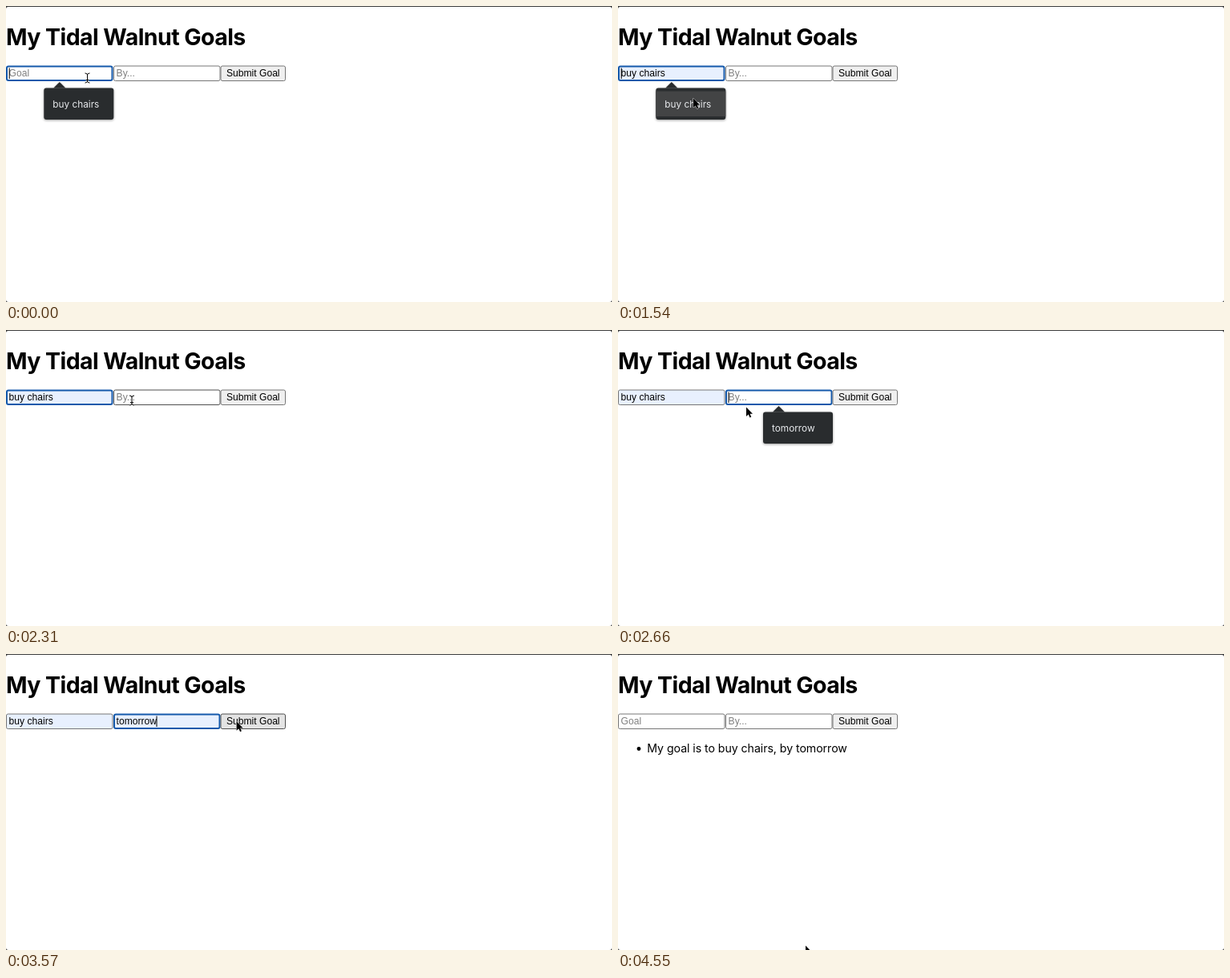
Write an HTML page that moves like this. It is 756 px wide and 370 px high and loops after 4.69 s.

```html
<!DOCTYPE html>
<html lang="en">
<head>
<meta charset="utf-8">
<title>Goals form</title>
<style>
  html, body { margin: 0; width: 100%; height: 100%; overflow: hidden; background: #fff; }
  svg { display: block; width: 756px; height: 370px; }
  text { font: 12.1px "Liberation Sans", Arial, sans-serif; }
  .ui { font-family: Inter, sans-serif; }
  .title { font-size: 28.5px; font-weight: 700; letter-spacing: -.02em; }
  .goal { font-size: 14.2px; letter-spacing: -.005em; }
  .option { font-size: 11.8px; fill: #e8eaed; }
  .popup { filter: drop-shadow(0 1px 1.5px rgba(0, 0, 0, .4)); }
</style>
</head>
<body>
<svg viewBox="0 0 756 370">
  <rect width="756" height="370" fill="#3c3c3c"/>
  <rect y="1" width="756" height="369" rx="3" fill="#fff"/>
  <text class="ui title" x="0" y="48.5">My Tidal Walnut Goals</text>
  <g id="fields"></g>
  <rect id="button" x="268" y="75" width="80.5" height="18.5" rx="2"/>
  <text x="275" y="88.3">Submit Goal</text>
  <g id="entry">
    <circle cx="26" cy="118.5" r="2.4"/>
    <text class="ui goal" x="36.3" y="123">My goal is to buy chairs, by tomorrow</text>
  </g>
  <g id="popups"></g>
  <path id="arrow" d="M0 .5V12L2.7 9.6 4.5 13.5 6.3 12.7 4.6 8.8H8Z" stroke="#fff" stroke-width=".8" paint-order="stroke"/>
  <g id="beam" fill="none">
    <path id="beamLine" d="M-3-6Q0-6 0-4 0-6 3-6M0-4.5V4.5M-3 6Q0 6 0 4 0 6 3 6M-2 2.5H2" stroke="#fff" stroke-width="2"/>
    <use href="#beamLine" style="display:none"/>
    <path d="M-3-6Q0-6 0-4 0-6 3-6M0-4.5V4.5M-3 6Q0 6 0 4 0 6 3 6M-2 2.5H2" stroke="#000"/>
  </g>
</svg>
<script>
const LOOP = 4690, STEP = 70;
const PICK_GOAL = 1750, FOCUS_BY = 2450, PICK_BY = 3080, PRESS = 3850, SUBMIT = 3920;
const byId = id => document.getElementById(id);
const show = (el, on) => el.setAttribute('visibility', on ? 'visible' : 'hidden');
const setAttrs = (el, attrs) => {
  for (const name in attrs) el.setAttribute(name, attrs[name]);
};
const borderColor = hovered => hovered ? '#4f4f4f' : '#767676';

// The pointer rests between these eased moves.
const pointerStart = { x: 101.5, y: 90 };
const moves = [
  { from: 140, to: 210, x: 127, y: 82 },
  { from: 1470, to: 1540, x: 94, y: 115 },
  { from: PICK_GOAL, to: 2310, x: 157, y: 88 },
  { from: FOCUS_BY, to: 2660, x: 160, y: 96 },
  { from: 2660, to: 2870, x: 223, y: 120 },
  { from: PICK_BY, to: 3640, x: 290.5, y: 82 },
  { from: 3990, to: 4550, x: 234, y: 364 }
];
const ease = k => k * k * (3 - 2 * k);

function pointerAt(t) {
  let { x, y } = pointerStart;
  for (const move of moves) {
    const k = ease(Math.min(1, Math.max(0, (t - move.from) / (move.to - move.from))));
    x += (move.x - x) * k;
    y += (move.y - y) * k;
  }
  return [x, y];
}

function addGroup(parent, markup) {
  const group = document.createElementNS('http://www.w3.org/2000/svg', 'g');
  group.innerHTML = markup;
  byId(parent).append(group);
  return group;
}

function makeField(x) {
  const group = addGroup('fields', `<rect/><text x="${x + 3.6}" y="88.3"></text><path stroke="#000"/>`);
  const [box, label, caret] = group.children;
  return ({ text, hint, focused, hovered, caretX }) => {
    const line = focused ? 2 : 1;
    setAttrs(box, {
      x: x + line / 2, y: 74.5 + line / 2, width: 133.5 - line, height: 19.5 - line, rx: 2,
      fill: text ? '#e8f0fe' : '#fff',
      stroke: focused ? '#1459ab' : borderColor(hovered), 'stroke-width': line
    });
    label.textContent = text || hint;
    label.setAttribute('fill', text ? '#000' : '#808080');
    caret.setAttribute('d', `M${caretX} 77.5V91`);
    show(caret, caretX > 0);
  };
}

function makePopup(x, option) {
  const group = addGroup('popups', `
    <g class="popup" fill="#292c2e">
      <rect x="${x}" y="102.5" width="87" height="39.5" rx="3"/>
      <path d="M${x + 12} 102.5l7.5-7.5 7.5 7.5Z"/>
    </g>
    <rect x="${x}" y="106.5" width="87" height="31.5" fill="#434445"/>
    <text class="ui option" x="${x + 11}" y="127">${option}</text>`);
  return (open, hovered) => {
    show(group, open);
    show(group.children[1], open && hovered);
  };
}

const drawGoal = makeField(0), drawBy = makeField(134);
const drawGoalPopup = makePopup(47.3, 'buy chairs');
const drawByPopup = makePopup(181, 'tomorrow');

function render(time) {
  const t = Math.floor(time % LOOP / STEP) * STEP;
  const [x, y] = pointerAt(t);
  const within = (left, top, right, bottom) => x >= left && x < right && y >= top && y < bottom;
  const between = (from, to) => t >= from && t < to;

  const overGoal = within(0, 75, 134, 95), overBy = within(134, 75, 267, 95);
  const overButton = within(268, 75, 349, 94);
  const goalOpen = t < PICK_GOAL, goalHover = within(47, 102, 134, 142);
  const byOpen = between(FOCUS_BY, PICK_BY), byHover = within(181, 102, 268, 142);
  const goalFilled = between(PICK_GOAL, SUBMIT) || goalOpen && goalHover;
  const byFilled = between(PICK_BY, SUBMIT) || byOpen && byHover;

  drawGoal({
    text: goalFilled ? 'buy chairs' : '', hint: 'Goal',
    focused: t < FOCUS_BY, hovered: overGoal, caretX: goalOpen ? 4.2 : 0
  });
  drawBy({
    text: byFilled ? 'tomorrow' : '', hint: 'By...',
    focused: between(FOCUS_BY, PRESS), hovered: overBy,
    caretX: byOpen ? 138 : between(PICK_BY, PRESS) ? 188 : 0
  });
  drawGoalPopup(goalOpen, goalHover);
  drawByPopup(byOpen, byHover);

  setAttrs(byId('button'), { fill: overButton ? '#e3e3e3' : '#efefef', stroke: borderColor(overButton) });
  show(byId('entry'), t >= SUBMIT);

  for (const id of ['arrow', 'beam']) {
    byId(id).setAttribute('transform', `translate(${x} ${y})`);
    show(byId(id), (id === 'beam') === (overGoal || overBy));
  }
}

const start = performance.now();
function tick() {
  render(performance.now() - start);
  requestAnimationFrame(tick);
}
tick();
</script>
</body>
</html>
```
